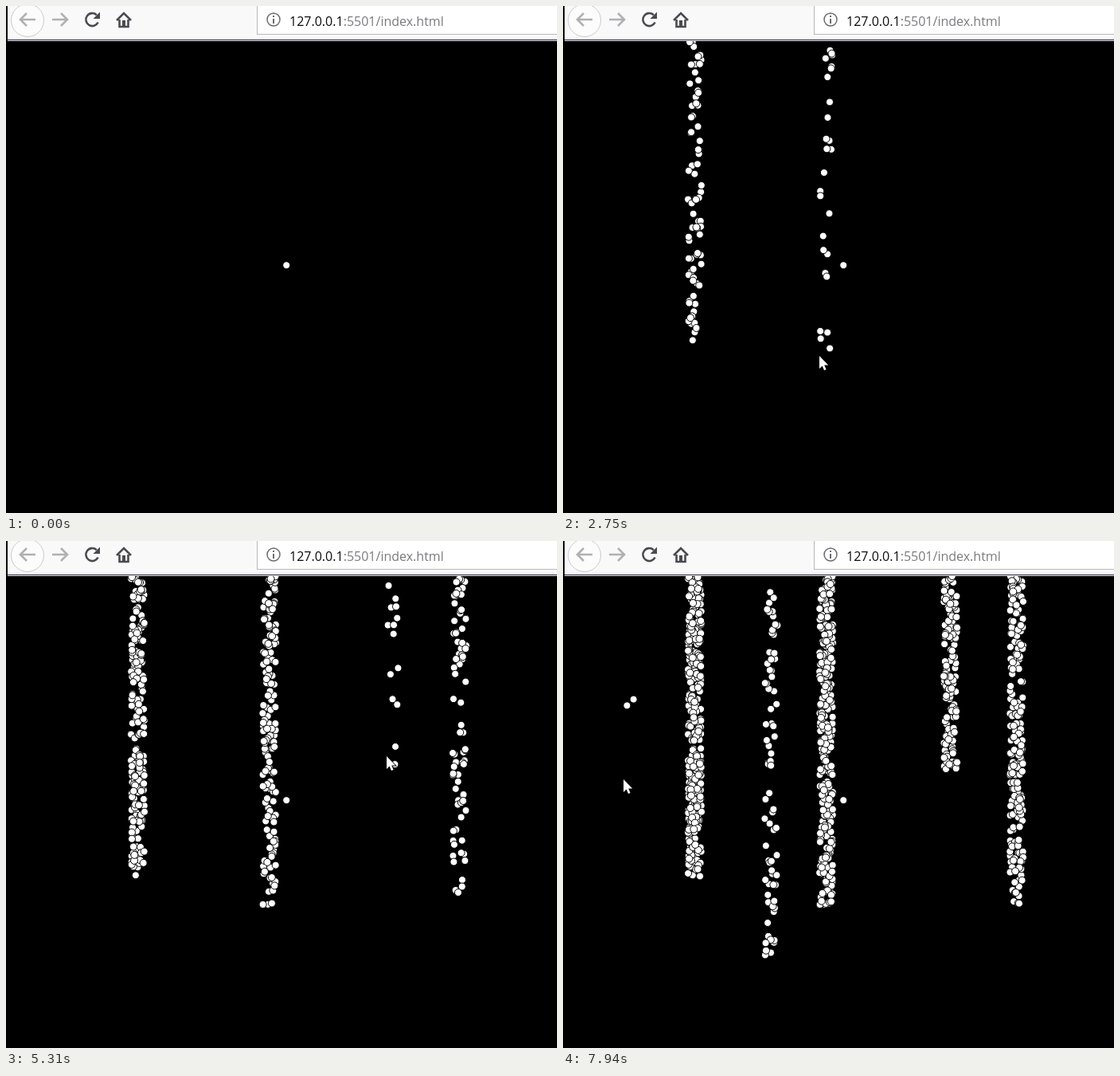
Animation, 692 px wide and 636 px high, one loop 8000 ms. Source, as an HTML page with a canvas:

```html
<!DOCTYPE html>
<html lang="en">
<head>
<meta charset="utf-8">
<title>Dots</title>
<style>
  html, body { margin: 0; width: 692px; height: 636px; overflow: hidden; background: #000; }
  canvas { display: block; }
</style>
</head>
<body>
<canvas id="stage" width="692" height="636"></canvas>
<script>
const g = document.getElementById('stage').getContext('2d');
const LOOP = 8000, STEP = 77.4, FIRST = 1280; // screen refresh grid
const RATE = 0.05;                            // dots per ms and column
const TRAVEL = 700, REST = 200;               // pointer moves, then waits before a click
const TOP = 44, SPREAD = 17;

// The pointer enters, then every click starts a column of dots.
// sag bends the way to the click downwards.
const entry = { x: 445, y: 592 };
const clicks = [
  { start: 1270, x: 157, y: 404, sag: 0 },
  { start: 2235, x: 322, y: 439, sag: 0 },
  { start: 3720, x: 561, y: 447, sag: 12 },
  { start: 5035, x: 478, y: 270, sag: 125 },
  { start: 6510, x: 253, y: 511, sag: 0 },
  { start: 7903, x: 76, y: 299, sag: 100 }
];

function seeded(seed) {
  return () => {
    seed = (seed + 0x6D2B79F5) | 0;
    let r = Math.imul(seed ^ (seed >>> 15), 1 | seed);
    r = (r + Math.imul(r ^ (r >>> 7), 61 | r)) ^ r;
    return ((r ^ (r >>> 14)) >>> 0) / 4294967296;
  };
}

function stroke(d, color, width) {
  g.strokeStyle = color;
  g.lineWidth = width;
  g.stroke(new Path2D(d));
}

function circle(x, y, r, fill, line, width = 1) {
  g.beginPath();
  g.arc(x, y, r, 0, 7);
  if (fill) { g.fillStyle = fill; g.fill(); }
  if (line) { g.strokeStyle = line; g.lineWidth = width; g.stroke(); }
}

function rect(x, y, w, h, fill) {
  g.fillStyle = fill;
  g.fillRect(x, y, w, h);
}

function dot(x, y) {
  circle(x, y, 4.5, '#fff', '#000');
}

function column({ start, x, y }, t) {
  const rnd = seeded(start);
  const count = Math.floor((t - start) * RATE) + 1;
  for (let i = 0; i < count; i++) {
    dot(x + rnd() * SPREAD, TOP + rnd() * (y + SPREAD - TOP));
  }
}

function toolbar() {
  const dark = '#4a4a4f', pale = '#b1b1b3';
  rect(0, 0, 692, TOP, '#f9f9fa');
  rect(0, 42, 692, 1, '#34344a');
  rect(0, 43, 692, 1, '#e4e4ee');
  rect(0, 0, 2, TOP, '#000');

  circle(27, 18, 20.5, '#fcfcfc', '#cbcbcc');
  stroke('M37 17H18M26 9L18 17L26 25', pale, 2.6);
  stroke('M58 17H77M69 9L77 17L69 25', pale, 2.6);
  stroke('M115.6 20.5A8 8 0 1 1 113.8 11.2', dark, 2.6);
  g.fillStyle = dark;
  g.fill(new Path2D('M118 7.5V16H109.5Z'));
  stroke('M139 18L148 9L157 18M142.5 17V26H153.5V17', dark, 2.6);
  rect(146, 18, 4, 7, dark);

  rect(315, -2, 400, 38, '#b9b9bb');
  rect(316, 0, 400, 35, '#fff');
  circle(336, 17, 8, null, '#6b6b70', 1.5);
  rect(335, 16, 2, 6, '#6b6b70');
  rect(335, 12, 2, 2, '#6b6b70');

  g.font = '16px "Open Sans", "Noto Sans", sans-serif';
  const host = '127.0.0.1';
  g.fillStyle = '#0c0c0d';
  g.fillText(host, 356, 25);
  g.fillStyle = '#7b7b80';
  g.fillText(':5501/index.html', 356 + g.measureText(host).width, 25);
}

function pointerAt(t) {
  let from = entry;
  for (const to of clicks) {
    const p = (t - (to.start - REST - TRAVEL)) / TRAVEL;
    if (p < 0) break;
    if (p < 1) {
      const e = p * p * (3 - 2 * p);
      return {
        x: from.x + (to.x - from.x) * e,
        y: from.y + (to.y - from.y) * e + to.sag * Math.sin(Math.PI * e)
      };
    }
    from = to;
  }
  return from;
}

function pointer(t) {
  const { x, y } = pointerAt(t);
  const arrow = new Path2D('M0 0V16L3.6 12.6L6 18L8.6 17L6.2 11.6H11.2Z');
  g.save();
  g.translate(Math.round(x), Math.round(y));
  g.strokeStyle = '#000';
  g.lineWidth = 1.6;
  g.stroke(arrow);
  g.fillStyle = '#fff';
  g.fill(arrow);
  g.restore();
}

function draw(time) {
  const t = FIRST + STEP * Math.floor((time - FIRST) / STEP + 0.1);
  rect(0, 0, 692, 636, '#000');
  dot(352.2, 325.2);
  for (const click of clicks) column(click, t);
  toolbar();
  if (time >= 440) pointer(t);
  for (const { start, x, y } of clicks) {
    if (t >= start - 50 && t < start + 27) circle(x, y - 1, 15, 'rgba(255,245,0,.48)');
  }
}

const begin = performance.now();
function tick() {
  draw((performance.now() - begin) % LOOP);
  requestAnimationFrame(tick);
}
tick();
</script>
</body>
</html>
```
